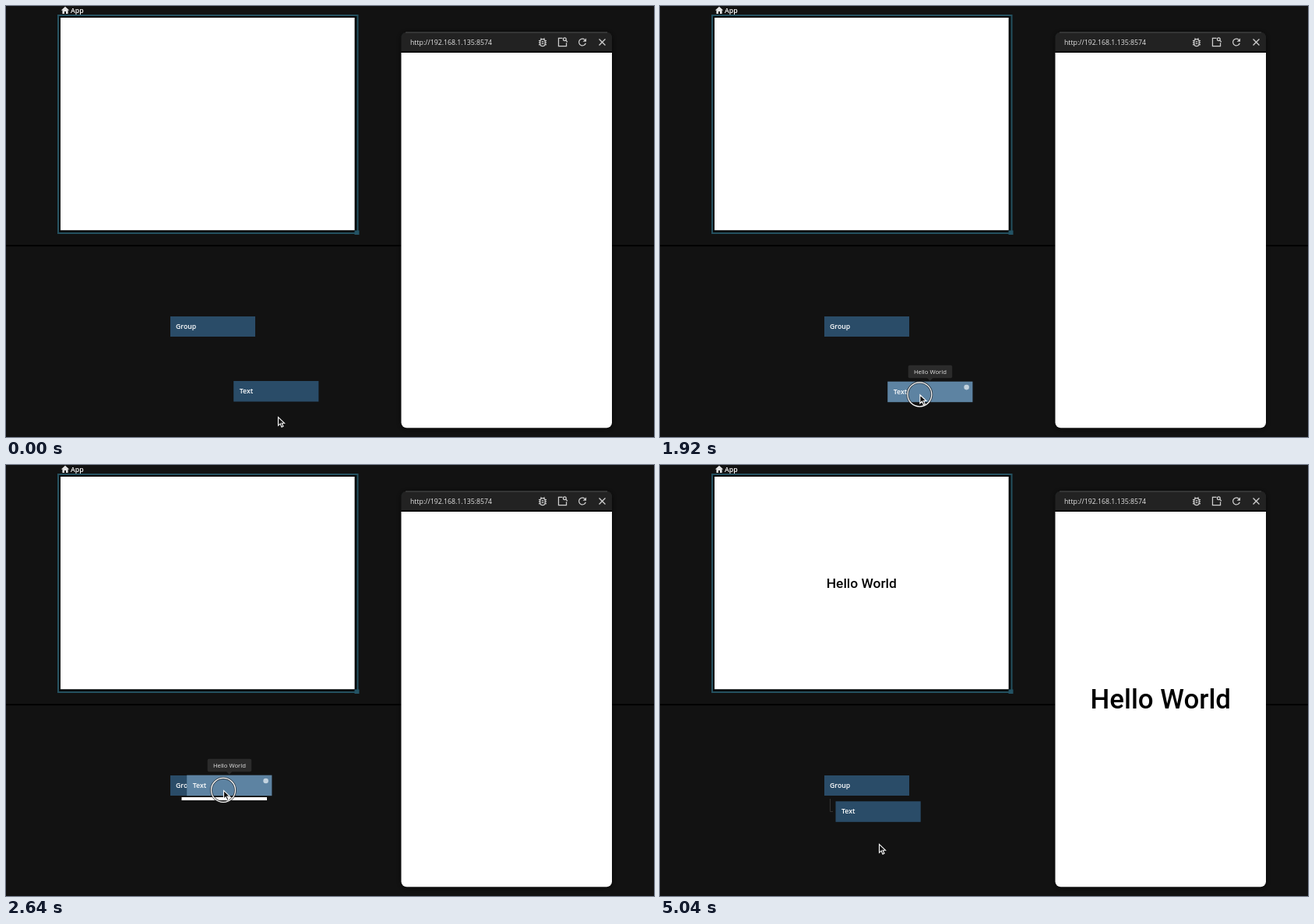
An HTML page that plays this animation: 832 px wide and 554 px high, repeating every 5.08 s.

```html
<!DOCTYPE html>
<html lang="en">
<head>
<meta charset="utf-8">
<title>Node editor</title>
<style>
  html, body { margin: 0; width: 100%; height: 100%; overflow: hidden; background: #121212; }
  svg { display: block; width: 832px; height: 554px; }
  text { font: 8.75px "Open Sans", sans-serif; fill: #e4e4e4; }
  .node { font-weight: 600; fill: #fff; }
  .tip { font-weight: 700; fill: #fff; }
  .mid { text-anchor: middle; }
  .small { font-size: 7.7px; }
  .hello { font: 500 17.4px Roboto, sans-serif; fill: #000; text-anchor: middle; }
  .icon { fill: none; stroke: #cfcfcf; stroke-width: 2; }
</style>
</head>
<body>
<svg viewBox="0 0 832 554">
  <defs>
    <filter id="shadow" x="-10%" y="-10%" width="120%" height="120%">
      <feDropShadow dx="0" dy="1" stdDeviation="4" flood-color="#000" flood-opacity=".6"/>
    </filter>
  </defs>
  <rect width="832" height="554" fill="#121212"/>
  <rect y="307" width="832" height="2" fill="#000"/>

  <!-- App canvas -->
  <path d="M76 .8 70.8 5.6h1.6v4.4h2.6V7h2v3h2.6V5.6h1.6z" fill="#e4e4e4"/>
  <text class="node" x="83" y="9">App</text>
  <rect x="67" y="12" width="384.5" height="280" fill="#080a0b" stroke="#24505f" stroke-width="2"/>
  <rect x="70" y="15" width="377.6" height="273.2" fill="#fff"/>
  <rect x="447.5" y="288.5" width="6" height="5.5" fill="#235365"/>

  <!-- Preview window -->
  <rect x="507.5" y="33.5" width="270.5" height="509" rx="7" fill="#222424" filter="url(#shadow)"/>
  <path d="M513 34H772" stroke="#4a4c4c"/>
  <path d="M507.5 60H778V535.2a7 7 0 0 1-7 7H514.5a7 7 0 0 1-7-7z" fill="#fff"/>
  <rect x="507.5" y="58.5" width="270.5" height="1.5" fill="#000"/>
  <text x="519" y="49.5">http://192.168.1.135:8574</text>
  <g class="icon">
    <g transform="translate(689 46.5) scale(.63)">
      <rect x="-5" y="-6" width="10" height="14" rx="5"/>
      <path d="M-8-3h3M5-3h3M-8 1h3M5 1h3M-8 5h3M5 5h3M-4-8l2 2M4-8l-2 2M-2-1h4M-2 3h4"/>
    </g>
    <g transform="translate(714.5 46.5) scale(.63)">
      <path d="M0-8H-8V8H8V1"/>
      <circle cx="4.5" cy="-6" r="3"/>
      <path d="M6.5-4 10-.5"/>
    </g>
    <g transform="translate(740 46.5) scale(.63)">
      <path d="M5-5A7 7 0 1 0 6.8 2"/>
      <path d="M8-8v7H1z" fill="#cfcfcf" stroke="none"/>
    </g>
    <path transform="translate(765.5 46.5) scale(.63)" d="M-6.3-6.3 6.3 6.3M6.3-6.3-6.3 6.3"/>
  </g>

  <g id="result">
    <text class="hello" x="258.8" y="157.6">Hello World</text>
    <text class="hello" x="642.8" y="312.8" style="font-size:34.8px">Hello World</text>
  </g>

  <!-- Nodes -->
  <rect x="211" y="399" width="109" height="26" fill="#2a4c68"/>
  <text class="node" x="218" y="415">Group</text>
  <path id="branch" d="M218.5 429V445.5H222" fill="none" stroke="#343434"/>
  <rect id="slot" x="225.5" y="427" width="109.5" height="4" fill="#fff"/>
  <g id="node">
    <rect id="face" width="109.2" height="26.5"/>
    <text class="node" x="7.5" y="16.2">Text</text>
    <circle id="dot" cx="101.4" cy="7.4" r="3.3"/>
    <g id="label">
      <path d="M50.5-5h8l-4 4z" fill="#2b2b2b"/>
      <rect x="26.5" y="-21" width="56.5" height="16.5" rx="2" fill="#2b2b2b"/>
      <text class="mid small" x="54.7" y="-10">Hello World</text>
    </g>
  </g>

  <g id="tip">
    <rect x="225.5" y="505" width="227" height="42" fill="#3e3e3e" filter="url(#shadow)"/>
    <text class="tip" x="237" y="523">This node is detached from the main node tree</text>
    <text class="tip" x="237" y="535.5">and won't be rendered</text>
  </g>

  <g id="cursor">
    <g id="ring" fill="none">
      <circle r="15.5" stroke="#222" stroke-width="3" stroke-opacity=".7"/>
      <circle r="15.5" stroke="#fff" stroke-width="1.2"/>
    </g>
    <path d="M.5.5V11.3L3.1 8.9 5 13.2 7 12.3 5.1 8.2H8.5z" fill="#111" stroke="#fff" stroke-width="1.1"/>
  </g>
</svg>
<script>
  const LOOP = 5080, STEP = 40, GRAB = 840, DROP = 3000;
  const el = Object.fromEntries([...document.querySelectorAll('[id]')].map(e => [e.id, e]));

  // Cursor path: time, x, y
  const path = [
    [40, 349, 528], [200, 344, 514], [360, 339, 501], [1880, 339, 502],
    [2000, 322, 494], [2120, 303, 481], [2280, 286, 453], [2440, 279, 429],
    [2560, 279, 418], [3880, 279, 417], [3960, 279, 440], [4080, 281, 477], [4280, 281, 487]
  ];

  const ramp = (t, a, b) => Math.min(1, Math.max(0, (t - a) / (b - a)));
  const show = (e, opacity) => e.setAttribute('opacity', opacity);
  const move = (e, x, y) => e.setAttribute('transform', `translate(${x} ${y})`);

  function cursorAt(t) {
    const i = path.findIndex(p => p[0] > t);
    if (i === 0) return path[0].slice(1);
    if (i < 0) return path[path.length - 1].slice(1);
    const [a, b] = [path[i - 1], path[i]], k = ramp(t, a[0], b[0]);
    return [a[1] + (b[1] - a[1]) * k, a[2] + (b[2] - a[2]) * k];
  }

  // The dragged node trails the cursor by one step
  function nodeAt(t) {
    if (t >= DROP) return [225.5, 432.3];
    const [x, y] = cursorAt(Math.max(t - STEP, GRAB));
    return [x - 46.8, y - 19.3];
  }

  function draw(t) {
    const [cx, cy] = cursorAt(t), [nx, ny] = nodeAt(t);
    const held = t >= GRAB && t < DROP, dropped = t >= DROP;
    const hover = dropped ? cy < 459 : cy < 509;

    move(el.cursor, cx, cy);
    move(el.node, nx, ny);
    el.face.setAttribute('fill', held ? '#5d83a2' : hover ? '#4a7090' : '#2a4c68');
    el.dot.setAttribute('fill', held ? '#c3d3df' : '#a8bccb');
    show(el.dot, +hover);
    show(el.label, dropped ? hover * ramp(t, 3600, 3800) : +(t >= 640));
    show(el.tip, ramp(t, 320, 440) * (1 - ramp(t, GRAB - STEP, 1000)));
    show(el.ring, ramp(t, GRAB - STEP, 1000) * (1 - ramp(t, DROP - STEP, 3160)));
    show(el.slot, +(t >= 2480 && !dropped));
    show(el.branch, +dropped);
    show(el.result, +(t >= DROP + 2 * STEP));
  }

  const start = performance.now();
  function tick() {
    const t = (performance.now() - start) % LOOP;
    draw(Math.floor(t / STEP) * STEP);
    requestAnimationFrame(tick);
  }
  tick();
</script>
</body>
</html>
```
